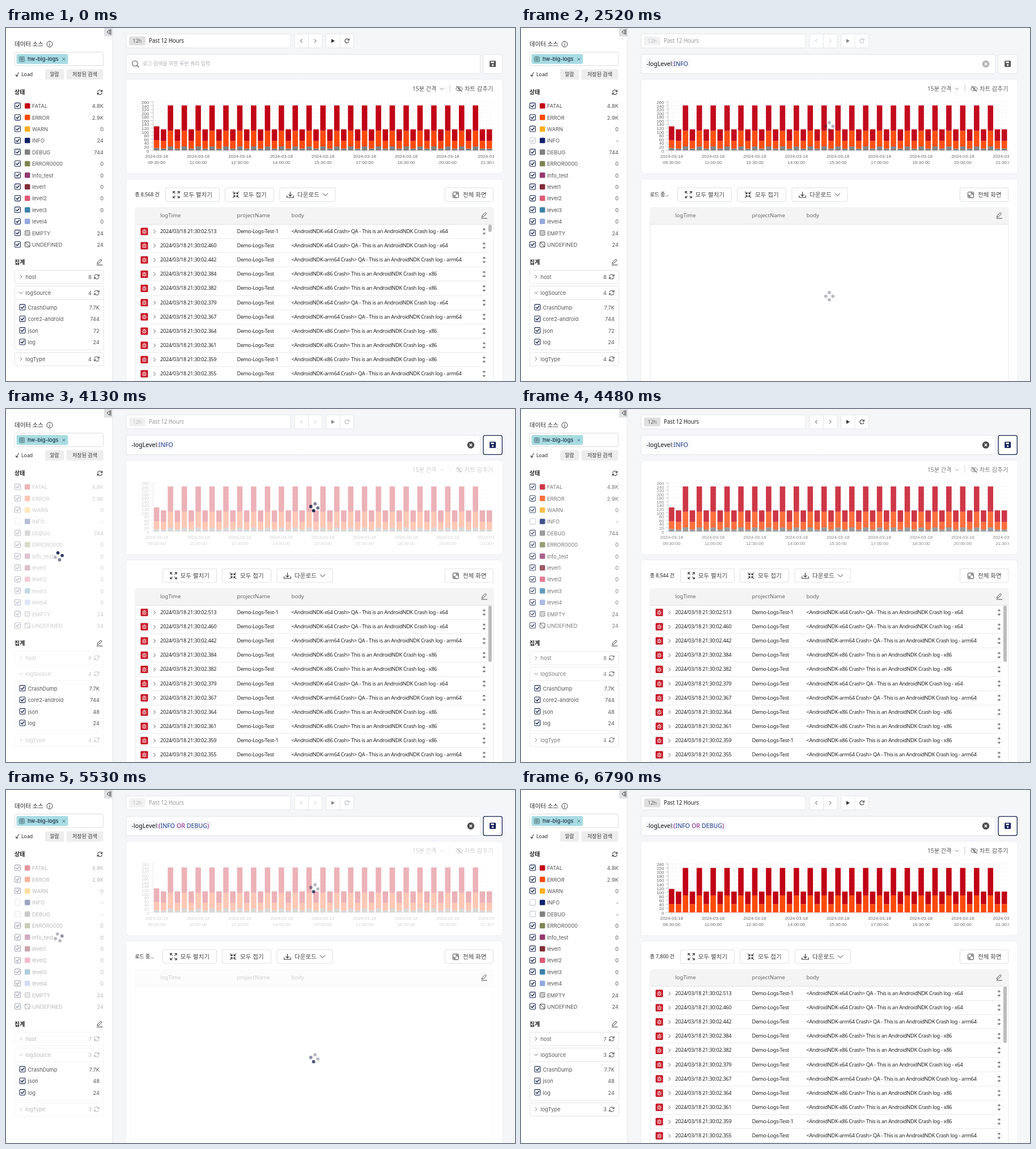
These frames come from a looping animation (898 px wide and 623 px high, 8000 ms). An HTML page with a canvas:

```html
<!DOCTYPE html>
<html lang="ko">
<head>
<meta charset="utf-8">
<title>Log search</title>
<style>
  html, body { margin: 0; width: 100%; height: 100%; overflow: hidden; background: #f4f6f8; }
  canvas { display: block; width: 898px; height: 623px; }
</style>
</head>
<body>
<canvas id="stage"></canvas>
<script>
const W = 898, H = 623, LOOP = 8000;
const canvas = document.getElementById('stage');
const dpr = window.devicePixelRatio || 1;
canvas.width = W * dpr;
canvas.height = H * dpr;
const ctx = canvas.getContext('2d');

const SANS = '"Noto Sans", "Noto Sans CJK KR", "Noto Sans CJK", sans-serif';
const INTER = 'Inter, sans-serif';
const ARIAL = '"Liberation Sans", sans-serif';
const NAVY = '#14254f', INK = '#222', GREY = '#555', EDGE = '#e3e5e8', OFF = '#b9bcc1';
const RED = '#c10216', ORANGE = '#fb4a0b', ASH = '#808080';

const LOADS = [
  { click: 2520, spin: 2590, side: 2973, rows: 3780, total: 4200, done: 4270 },
  { click: 4830, spin: 4890, side: 5300, rows: 5950, total: 6160, done: 6330 }
];
const LEVELS = [
  ['FATAL', RED, '4.8K'], ['ERROR', ORANGE, '2.9K'], ['WARN', '#ffae1c', '0'],
  ['INFO', '#11246a', '24'], ['DEBUG', ASH, '744'], ['ERROR0000', '#7e8451', '0'],
  ['Info_test', '#92386f', '0'], ['level1', '#802c37', '0'], ['level2', '#dc5a76', '0'],
  ['level3', '#3c82aa', '0'], ['level4', '#93a9de', '0'], ['EMPTY', null, '24'], ['UNDEFINED', null, '24']
];
const MS = [513, 460, 442, 384, 382, 379, 367, 364, 361, 359, 355];
const ARCH = ['x64', 'x64', 'arm64', 'x86', 'x86', 'x64', 'arm64', 'x86', 'x86', 'x86', 'arm64'];

const clamp = v => Math.max(0, Math.min(1, v));
const ramp = (t, start, len = 300) => clamp((t - start) / len);
const ease = p => p * p * (3 - 2 * p);
const mix = (a, b, p) => a + (b - a) * p;

// ---- drawing helpers ----
function text(s, x, y, size, color, { align = 'left', weight = 400, font = SANS, gap = 0 } = {}) {
  ctx.font = `${weight} ${size}px ${font}`;
  ctx.letterSpacing = gap + 'px';
  ctx.textAlign = align;
  ctx.fillStyle = color;
  ctx.fillText(s, x, y + size * 0.37);
  return ctx.measureText(s).width;
}
function box(x, y, w, h, r, fill, stroke, lw = 1) {
  const o = stroke ? lw / 2 : 0;
  ctx.beginPath();
  ctx.roundRect(x + o, y + o, w - 2 * o, h - 2 * o, r);
  if (fill) { ctx.fillStyle = fill; ctx.fill(); }
  if (stroke) { ctx.strokeStyle = stroke; ctx.lineWidth = lw; ctx.stroke(); }
}
function path(x, y, color, lw, ...lines) {
  ctx.beginPath();
  for (const p of lines)
    for (let i = 0; i < p.length; i += 2) ctx[i ? 'lineTo' : 'moveTo'](x + p[i], y + p[i + 1]);
  ctx.strokeStyle = color;
  ctx.lineWidth = lw;
  ctx.stroke();
}
function circle(x, y, r, fill, stroke, lw = 1) {
  ctx.beginPath();
  ctx.arc(x, y, r, 0, Math.PI * 2);
  if (fill) { ctx.fillStyle = fill; ctx.fill(); }
  if (stroke) { ctx.strokeStyle = stroke; ctx.lineWidth = lw; ctx.stroke(); }
}
function dim(alpha, draw) {
  ctx.save();
  ctx.globalAlpha *= alpha;
  draw();
  ctx.restore();
}

// ---- icons ----
const right = (x, y, c, s = 3) => path(x, y, c, 1, [-s / 2, -s, s / 2, 0, -s / 2, s]);
const left = (x, y, c, s = 3) => path(x, y, c, 1, [s / 2, -s, -s / 2, 0, s / 2, s]);
const down = (x, y, c, s = 3) => path(x, y, c, 1, [-s, -s / 2, 0, s / 2, s, -s / 2]);

function refresh(x, y, c, r = 4) {
  for (const a of [0, Math.PI]) {
    ctx.save();
    ctx.translate(x, y);
    ctx.rotate(a);
    ctx.beginPath();
    ctx.arc(0, 0, r, Math.PI * 1.05, Math.PI * 1.85);
    ctx.strokeStyle = c;
    ctx.lineWidth = 1.1;
    ctx.stroke();
    path(0, 0, c, 1.1, [r + .3, -r - .2, r + .3, -1.4, r - 2.8, -1.4]);
    ctx.restore();
  }
}
function reload(x, y, c) {
  ctx.beginPath();
  ctx.arc(x, y, 3.6, 0.3, Math.PI * 1.8);
  ctx.strokeStyle = c;
  ctx.lineWidth = 1.1;
  ctx.stroke();
  path(x, y, c, 1.1, [3.9, -4, 3.9, -1.2, 1, -1.2]);
}
function pencil(x, y, c) {
  path(x, y, c, 1, [-4, 3, -3.6, .6, 2.2, -5, 4.2, -3, -1.6, 2.6, -4, 3], [-5, 5.2, 5.5, 5.2]);
}
function tick(x, y, c) { path(x, y, c, 1.5, [-2.8, -.1, -.7, 2.1, 3, -2.3]); }
function checkbox(x, y, mark = 1, pending) {
  const c = mark === 1 && !pending ? NAVY : '#c4c7cc';
  box(x - 5.5, y - 5.5, 11, 11, 1.5, '#fff', c, 1.1);
  if (mark > 0) dim(mark, () => tick(x, y, c));
}
function bug(x, y) {
  box(x - 6.5, y - 6.5, 13, 13, 1.5, '#c4101f');
  ctx.beginPath();
  ctx.ellipse(x, y + .6, 2.3, 3.2, 0, 0, 7);
  ctx.strokeStyle = '#fff';
  ctx.lineWidth = .9;
  ctx.stroke();
  path(x, y, '#fff', .8, [0, -2, 0, 3.6], [-4.4, .6, -2.3, .6], [2.3, .6, 4.4, .6],
    [-4, -2.8, -2, -1.2], [4, -2.8, 2, -1.2], [-4, 4, -2, 2.4], [4, 4, 2, 2.4], [-1.6, -4.2, 0, -2.8, 1.6, -4.2]);
}
function corners(x, y, out) {
  for (const sx of [-1, 1]) for (const sy of [-1, 1]) {
    const a = out ? 5.6 : 1.6, b = out ? 2.2 : 4.6;
    path(x, y, '#333', 1.1, [sx * 1.9, sy * 1.9, sx * 5.4, sy * 5.4], [sx * b, sy * a, sx * a, sy * a, sx * a, sy * b]);
  }
}
function floppy(x, y, c) {
  box(x - 5.5, y - 5.5, 11, 11, 1.5, c);
  ctx.fillStyle = '#fff';
  ctx.fillRect(x - 3.2, y - 4, 5.4, 2.6);
  circle(x, y + 2, 1.6, '#fff');
}
function spinner(x, y, age) {
  const sec = Math.max(0, age) / 1000;
  const turn = Math.PI / 4 + sec / 1.2 * Math.PI * 2;
  for (let i = 0; i < 4; i++) {
    const u = Math.max(0, sec - i * 0.4) % 2;
    const a = turn + Math.PI * (1.25 + i / 2);
    dim(0.3 + 0.7 * (u < 1 ? u : 2 - u), () =>
      circle(x + Math.cos(a) * 6.3, y + Math.sin(a) * 6.3, 2.9, '#101d45'));
  }
}

// ---- sidebar ----
function sidebar(s) {
  box(0, 0, 188, H, 0, '#fff');
  ctx.fillStyle = '#e1e4e8';
  ctx.fillRect(187.5, 0, 1, H);
  box(173, 0, 15, 15, 0, '#dfe0e2');
  path(180, 7, '#444', 1, [3, -4, -2, 0, 3, 4, 3, -4], [5, -5, 5, 5]);

  text('데이터 소스', 15, 28.5, 10.5, INK, { weight: 500 });
  circle(77, 28.5, 5, null, '#333', 1);
  path(77, 28.5, '#333', 1.1, [0, -.6, 0, 2.8], [0, -2.8, 0, -1.6]);
  box(15, 42, 157, 25, 2, '#fff', '#dadde1');
  box(18.5, 46, 91, 17.5, 3, '#a8dce2');
  box(23, 50, 10, 10, 2, '#8ab5bc', '#4f7f87', .8);
  text('G', 28, 55, 6, '#33616a', { align: 'center', font: INTER });
  text('hw-big-logs', 38, 55, 9.3, '#1c3144', { weight: 500, font: INTER });
  path(102, 55, '#45707a', 1, [-2.4, -2.4, 2.4, 2.4], [-2.4, 2.4, 2.4, -2.4]);
  path(20, 82, '#222', 1, [2.5, -4, .5, 0, -1.5, 3], [-2.5, 0, -2, 3.2, 1.4, 2.4]);
  text('Load', 27, 82, 8.8, INK);
  box(69, 73, 33.5, 18, 2, '#ededee');
  text('알람', 85.5, 82, 8.8, '#333', { align: 'center' });
  box(106.5, 73, 65, 18, 2, '#ededee');
  text('저장된 검색', 139, 82, 9.1, '#333', { align: 'center' });

  text('상태', 15, 113, 10, INK, { weight: 700 });
  refresh(165.5, 113.5, '#333');
  dim(s.sideAlpha, () => LEVELS.forEach((l, i) => level(l, i, s)));
  if (s.sideSpin) spinner(93, 260, s.t - s.load.side);

  text('집계', 15, 413, 10, INK, { weight: 700 });
  pencil(165, 413, '#333');
  groups(s);
}
function level([name, color, count], i, s) {
  const y = 137.3 + i * 20.39;
  const cut = name === 'INFO' ? LOADS[0] : name === 'DEBUG' ? LOADS[1] : null;
  const off = cut && s.t >= cut.click;
  checkbox(20.5, y, off ? 1 - ramp(s.t, cut.click, 100) : 1, off);
  if (color) box(33, y - 4.6, 9.5, 9.5, 1.5, color);
  else if (name === 'EMPTY') {
    ctx.setLineDash([2, 1.2]);
    box(33, y - 4.6, 9.5, 9.5, 1, '#ccc', '#333');
    ctx.setLineDash([]);
  } else {
    box(33, y - 4.6, 9.5, 9.5, 1, '#fff', '#333');
    path(37.7, y, '#333', 1, [-4, -4, 4, 4]);
  }
  text(name, 46, y + .5, 9.3, GREY, { font: INTER });
  text(off ? '-' : count, 172, y + .5, 9.3, GREY, { align: 'right', font: INTER });
}
function groups(s) {
  const items = [['CrashDump', '7.7K'], ['core2-android', '744'], ['json', s.aggregated > 0 ? '48' : '72'], ['log', '24']];
  if (s.aggregated > 1) items.splice(1, 1);
  const n = items.length, shift = (n - 4) * 20.4;
  const head = (name, y, count, open) => {
    (open ? down : right)(26.5, y, '#666', open ? 3.2 : 3);
    text(name, 34.5, y + .3, 9.3, GREY, { font: INTER });
    text(count, 151, y + .3, 9.3, GREY, { align: 'right', font: INTER });
    refresh(160, y, '#555');
  };
  dim(s.sideAlpha, () => {
    box(15, 427, 158, 24.5, 2, '#fff', EDGE);
    box(15, 455, 158, 113.5 + shift, 2, '#fff', EDGE);
    ctx.fillStyle = EDGE;
    ctx.fillRect(15, 479, 158, 1);
    box(15, 572 + shift, 158, 24.5, 2, '#fff', EDGE);
    head('host', 439, n + 4);
    head('logSource', 467.3, n, true);
    head('logType', 584 + shift, n);
  });
  items.forEach(([name, count], i) => {
    const y = 492.8 + i * 20.4;
    checkbox(29, y);
    text(name, 38.5, y + .5, 9.3, GREY, { font: INTER });
    text(count, 165, y + .5, 9.3, GREY, { align: 'right', font: INTER });
  });
}

// ---- top bars ----
function toolbar(s) {
  const c = s.busy ? OFF : '#333';
  box(211.5, 10, 291, 25.5, 2, '#fff', EDGE);
  box(217, 15, 29, 15.5, 2, s.busy ? '#f1f1f1' : '#dfdfe0');
  text('12h', 231.5, 22.7, 9, s.busy ? OFF : '#666', { align: 'center' });
  text('Past 12 Hours', 252, 22, 9.9, s.busy ? '#999' : INK, { gap: -0.2 });
  for (const x of [508.5, 564]) {
    box(x, 10, 50, 25.5, 2, '#fff', EDGE);
    ctx.fillStyle = EDGE;
    ctx.fillRect(x + 24.5, 10, 1, 25);
  }
  left(521, 22.7, c);
  right(545.5, 22.7, c);
  ctx.beginPath();
  ctx.moveTo(574, 19.2); ctx.lineTo(580, 22.7); ctx.lineTo(574, 26.2);
  ctx.fillStyle = s.busy ? '#888' : '#333';
  ctx.fill();
  reload(601.5, 22.7, c);

  box(211.5, 46, 625.5, 35, 2, '#fff', EDGE);
  if (!s.load) {
    circle(227.5, 62.5, 4.8, null, '#555', 1.1);
    path(227.5, 62.5, '#555', 1.2, [3.4, 3.4, 7, 7]);
    text('로그 검색을 위한 루씬 쿼리 입력', 241, 62.5, 9, '#a9adb3');
  } else query(s);
  box(841.5, 46, 34.5, 35, 3, '#fff', s.active ? NAVY : EDGE, s.active ? 1.3 : 1);
  floppy(858.7, 63.3, s.active ? '#14205a' : '#555');
}
function query(s) {
  const blue = '#1d3c8f', plum = '#8d1b8d';
  const runs = [['-logLevel', '#111'], [':', plum]];
  if (s.load === LOADS[0]) runs.push(['INFO', blue]);
  else runs.push(['(', plum], ['INFO', blue], [' OR ', plum], ['DEBUG', blue], [')', plum]);
  box(220, 55, s.load === LOADS[0] ? 78 : 143, 16, 2, '#f5f6f8');
  let x = 221.5;
  for (const [word, color] of runs) x += text(word, x, 63, 10.6, color, { gap: 0.05 });
  const shade = s.load === LOADS[0] ? Math.round(mix(180, 75, ramp(s.t, s.load.click))) : 75;
  circle(820, 63.5, 6.2, `rgb(${shade},${shade},${shade})`);
  path(820, 63.5, '#fff', 1.4, [-2.2, -2.2, 2.2, 2.2], [-2.2, 2.2, 2.2, -2.2]);
}

// ---- chart ----
function chart(s) {
  box(211, 90, 665.5, 167.5, 5, '#fff', '#eceef1');
  dim(s.chartAlpha, () => {
    text('15분 간격', 717, 107, 10.2, GREY);
    down(769, 107.3, '#888', 3.2);
    ctx.fillStyle = '#ccc';
    ctx.fillRect(782.5, 100, 1, 13);
    ctx.beginPath();
    ctx.ellipse(799.5, 107.3, 5.5, 3.6, 0, 0, 7);
    ctx.strokeStyle = '#555';
    ctx.lineWidth = 1;
    ctx.stroke();
    circle(799.5, 107.3, 1.6, null, '#555');
    path(799.5, 107.3, '#555', 1.1, [-5, -5, 5, 5]);
    text('차트 감추기', 859.5, 107, 10.4, GREY, { align: 'right' });
    plot(s.morph);
  });
  if (s.spinning) spinner(544, 173.3, s.t - s.load.spin);
}
function plot(p) {
  const base = 216, max = mix(260, 240, p), unit = 85.6 / max;
  ctx.save();
  ctx.beginPath();
  ctx.rect(212, 120, 649, 130);
  ctx.clip();
  for (let v = 0; v <= (p > 0 ? 240 : 260); v += 20) {
    const y = base - v * unit;
    ctx.setLineDash([3, 3]);
    path(0, y, '#e6e7e9', .8, [259, 0, 860, 0]);
    ctx.setLineDash([]);
    path(0, y, '#bbb', .8, [255, 0, 259, 0]);
    text(v, 252.5, y + .6, 8, '#666', { align: 'right', font: ARIAL });
  }
  path(259.5, 0, '#c8c8c8', 1, [0, 129, 0, base]);
  path(0, base, '#c8c8c8', 1, [259, 0, 860, 0]);
  for (let i = 0; i < 49; i++) {
    const x = 265.7 + i * 12.23;
    const tall = i > 1 && i < 48 && i % 2 === 0;
    const [ash, orange, red] = tall ? [21, 84, 136] : i ? [10, 41, 62] : [13, 42, 74];
    let y = base;
    for (const [v, color] of [[ash * (1 - p), ASH], [orange, ORANGE], [red, RED]]) {
      ctx.fillStyle = color;
      ctx.fillRect(x - 4.8, y - v * unit, 9.6, v * unit);
      y -= v * unit;
    }
    if (i % 6 === 0) {
      const min = 570 + i * 15, pad = n => String(n).padStart(2, '0');
      path(x, base, '#bbb', .8, [0, 0, 0, 4]);
      text('2024-03-18', x, 226, 7.9, '#666', { align: 'center', font: ARIAL });
      text(`${pad(Math.floor(min / 60))}:${pad(min % 60)}:00`, x, 237, 8, '#666', { align: 'center', font: ARIAL });
    }
  }
  ctx.restore();
}

// ---- log table ----
function button(x, w, label, textX, icon) {
  box(x, 281.5, w, 25, 2, '#fff', '#dddfe3');
  icon();
  text(label, textX, 294, 10.6, '#444');
}
function logs(s) {
  box(211, 266, 665.5, 370, 5, '#fff', '#eceef1');
  if (s.count) text(s.count, 227.5, 294, 8.9, INK, { gap: -0.05 });
  const d = s.counted ? 0 : -5;
  button(281 + d, 96, '모두 펼치기', 312.5 + d, () => corners(300.5 + d, 294.2, true));
  button(386 + d, 87, '모두 접기', 418 + d, () => corners(405.5 + d, 294.2, false));
  button(482.5 + d, 99, '다운로드', 514 + d, () => {
    path(501.5 + d, 294, '#333', 1.1, [0, -5, 0, 2.4], [-3, -.4, 0, 2.6, 3, -.4], [-5.8, 1.5, -5.8, 5, 5.8, 5, 5.8, 1.5]);
    down(563.5 + d, 294, '#333', 4.5);
  });
  button(774, 86, '전체 화면', 806, () => {
    box(788, 289, 11, 11, 1, null, '#444');
    path(793.5, 294.5, '#444', 1, [-3, 3, 3, -3], [0, -3.2, 3.2, -3.2, 3.2, 0], [-3.2, 0, -3.2, 3.2, 0, 3.2]);
  });

  dim(s.tableAlpha, () => {
    box(227.5, 316.5, 633, 330, 4, '#fff', '#e6e8ea');
    ctx.beginPath();
    ctx.roundRect(228, 317, 632, 29, [4, 4, 0, 0]);
    ctx.fillStyle = '#f4f4f5';
    ctx.fill();
    ctx.fillStyle = '#dfe1e4';
    ctx.fillRect(228, 346, 632, 1);
    text('logTime', 272, 330.5, 9.6, '#666');
    text('projectName', 407.5, 330.5, 9.6, '#666');
    text('body', 503.5, 330.5, 9.6, '#666');
    if (s.rows) {
      MS.forEach(row);
      box(851, 347, 6, s.load ? 99.5 : 13, 3, '#bdbdbe');
    }
  });
  pencil(843.5, 330.8, '#444');
  if (!s.rows) spinner(544, 473.3, s.t - s.load.spin);
}
function row(ms, i) {
  const y = 359 + i * 25.13, style = { gap: -0.29 };
  const arch = ARCH[i], qa = arch === 'x86' ? '' : 'QA - ';
  bug(244, y);
  right(262, y + .2, '#555', 3.2);
  text(`2024/03/18 21:30:02.${ms}`, 272, y - .5, 9.2, INK, style);
  text('Demo-Logs-Test' + (i % 9 ? '' : '-1'), 407.5, y - .5, 9.2, INK, style);
  text(`<AndroidNDK-${arch} Crash> ${qa}This is an AndroidNDK Crash log - ${arch}`, 503.5, y - .5, 9.2, INK, style);
  path(843.5, y, '#444', 1, [-2.6, -2.6, 0, -5, 2.6, -2.6], [-2.6, 2.6, 0, 5, 2.6, 2.6], [0, -4.6, 0, -1.6], [0, 1.6, 0, 4.6]);
  ctx.fillStyle = '#e8eaec';
  ctx.fillRect(228, Math.round(371 + i * 25.13), 620, 1);
}

// Everything visible follows from the time alone.
function stateAt(t) {
  const load = LOADS.filter(l => t >= l.click).pop();
  const veil = (from, to) => load ? 1 - 0.7 * ramp(t, from) * (1 - ramp(t, to)) : 1;
  const s = {
    t, load, rows: true, counted: true, count: '총 8,568 건',
    active: t >= LOADS[0].spin, aggregated: LOADS.filter(l => t >= l.click + 140).length,
    morph: ease(ramp(t, 6290)), chartAlpha: 1, sideAlpha: 1, tableAlpha: 1
  };
  if (!load) return s;
  s.rows = t >= load.rows;
  s.counted = t >= load.total;
  s.busy = !s.counted;
  s.count = s.counted ? (load === LOADS[0] ? '총 8,544 건' : '총 7,800 건') : s.rows ? '' : '로드 중...';
  s.spinning = t < load.done;
  s.sideSpin = t >= load.side && t < load.done;
  s.chartAlpha = veil(load.click - 15, load.done);
  s.sideAlpha = veil(load.side - 20, load.done);
  s.tableAlpha = veil(load.click, load.rows);
  return s;
}
function draw(now) {
  const s = stateAt(now % LOOP);
  ctx.setTransform(dpr, 0, 0, dpr, 0, 0);
  ctx.fillStyle = '#f4f6f8';
  ctx.fillRect(0, 0, W, H);
  sidebar(s);
  toolbar(s);
  chart(s);
  logs(s);
}
let start;
function loop(now) {
  start ??= now;
  draw(now - start);
  requestAnimationFrame(loop);
}
requestAnimationFrame(loop);
</script>
</body>
</html>
```
